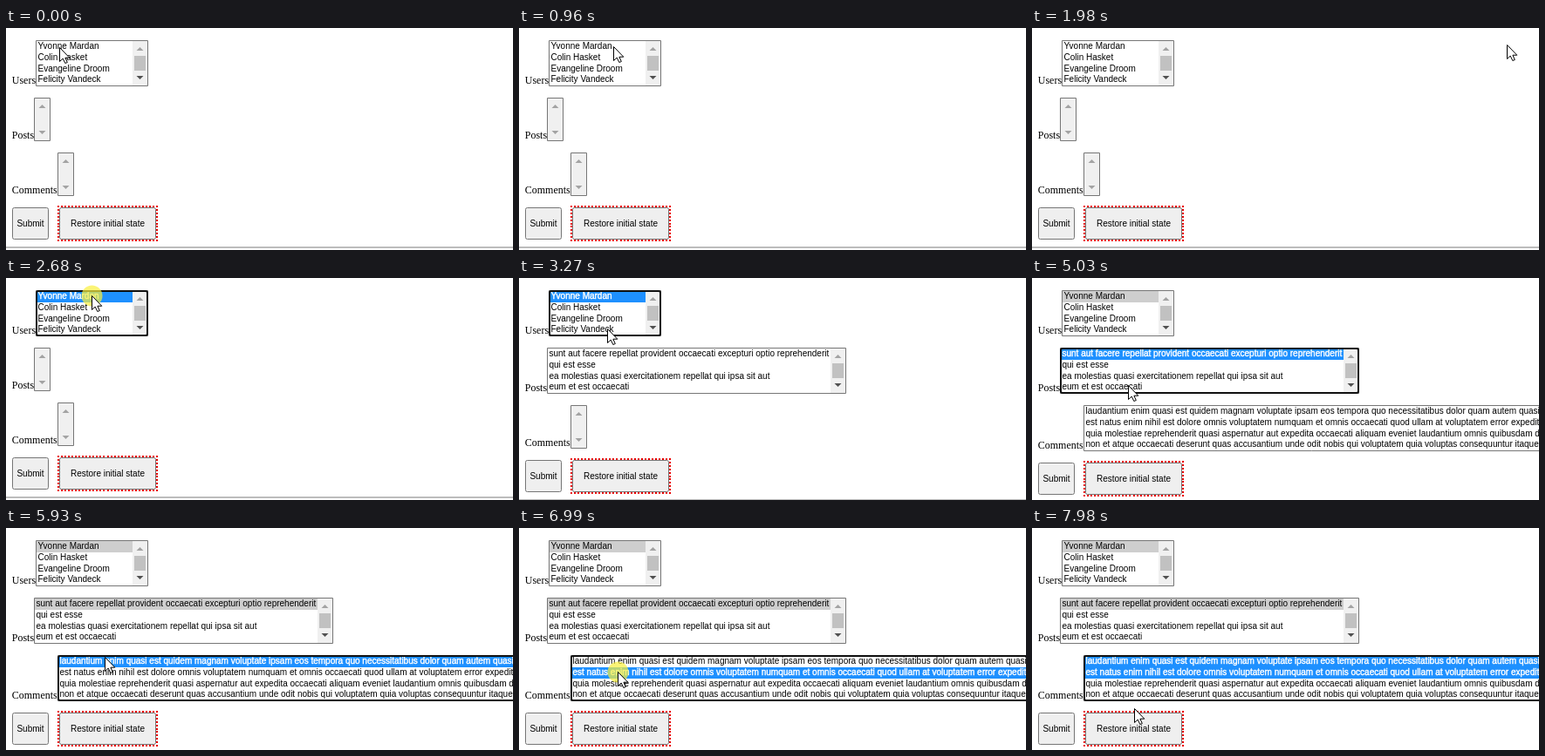
An HTML page with a canvas for the animation above (8000 ms loop, 581x255 px).

```html
<!DOCTYPE html>
<html lang="en">
<head>
<meta charset="utf-8">
<title>Linked lists form</title>
<style>
  html, body { margin: 0; width: 100%; height: 100%; overflow: hidden; background: #fff; }
  canvas { display: block; }
</style>
</head>
<body>
<canvas id="stage" width="581" height="255"></canvas>
<script>
const ctx = document.getElementById('stage').getContext('2d');
const LOOP = 8000;
const SANS = '10px "Liberation Sans", Arial, sans-serif';
const SERIF = '12px "Liberation Serif", "Times New Roman", serif';

const users = ['Yvonne Mardan', 'Colin Hasket', 'Evangeline Droom', 'Felicity Vandeck'];
const posts = [
  'sunt aut facere repellat provident occaecati excepturi optio reprehenderit',
  'qui est esse',
  'ea molestias quasi exercitationem repellat qui ipsa sit aut',
  'eum et est occaecati'
];
const comments = [
  'laudantium enim quasi est quidem magnam voluptate ipsam eos tempora quo necessitatibus dolor quam autem quasi reiciendis',
  'est natus enim nihil est dolore omnis voluptatem numquam et omnis occaecati quod ullam at voluptatem error expedita pariatur',
  'quia molestiae reprehenderit quasi aspernatur aut expedita occaecati aliquam eveniet laudantium omnis quibusdam delectus',
  'non et atque occaecati deserunt quas accusantium unde odit nobis qui voluptatem quia voluptas consequuntur itaque dolor'
];

// Moments at which the form changes
const PICK_USER = 2680, POSTS_IN = 2750;
const PICK_POST = 4310, COMMENTS_IN = 4440;
const PICK_FIRST = 5850, FIRST_DONE = 5930;
const PICK_SECOND = 6990, BOTH_PICKED = 7070;
const clicks = [[PICK_USER, POSTS_IN], [PICK_POST, COMMENTS_IN],
                [PICK_FIRST, FIRST_DONE], [PICK_SECOND, BOTH_PICKED]];

const easeIn = p => p * p;
const easeOut = p => 1 - (1 - p) * (1 - p);

// Pointer moves: start, end, steps, bend x/y, goal x/y, easing
const moves = [
  [130, 230, 3, 63, 22, 65, 22, easeOut],
  [920, 1045, 6, 260, 16, 467, 28, easeIn],
  [1980, 1981, 1, 544, 19, 544, 19, easeOut],
  [2010, 2620, 22, 300, -19, 98, 20, easeOut],
  [2960, 3740, 26, 105, 50, 98, 81, easeOut],
  [3790, 4020, 5, 100, 83, 98, 85, easeOut],
  [4720, 5480, 24, 110, 114, 113, 143, easeOut],
  [5530, 5720, 4, 113, 146, 113, 148, easeOut],
  [6110, 6430, 10, 113, 157, 113, 165, easeOut],
  [7360, 7980, 20, 116, 188, 117, 207, easeOut]
];

function pointerAt(t) {
  let x = 61, y = 22;
  for (const [start, end, steps, bx, by, gx, gy, ease] of moves) {
    if (t < start) break;
    const part = Math.min(1, (t - start) / (end - start));
    const p = ease((Math.floor(part * (steps - 1)) + 1) / steps), q = 1 - p;
    x = q * q * x + 2 * q * p * bx + p * p * gx;
    y = q * q * y + 2 * q * p * by + p * p * gy;
  }
  return { x: Math.round(x), y: Math.round(y), shown: t < 1070 || t >= 1980 };
}

function rect(x, y, w, h, color) {
  ctx.fillStyle = color;
  ctx.fillRect(x, y, w, h);
}

function frame(x, y, w, h, fill, radius = 0) {
  ctx.beginPath();
  ctx.roundRect(x + 0.5, y + 0.5, w - 1, h - 1, radius);
  ctx.fillStyle = fill;
  ctx.fill();
  ctx.strokeStyle = '#767676';
  ctx.lineWidth = 1;
  ctx.stroke();
}

function text(str, x, y, font = SANS, color = '#000', align = 'left') {
  ctx.font = font;
  ctx.fillStyle = color;
  ctx.textAlign = align;
  ctx.fillText(str, x, y);
}

// White on blue is rendered a little heavier
function selectedText(str, x, y) {
  text(str, x, y, SANS, '#fff');
  ctx.strokeStyle = '#fff';
  ctx.lineWidth = 0.4;
  ctx.strokeText(str, x, y);
}

function arrow(x, y, dir, color) {
  ctx.beginPath();
  ctx.moveTo(x - 4, y + 2 * dir);
  ctx.lineTo(x + 4, y + 2 * dir);
  ctx.lineTo(x, y - 2 * dir);
  ctx.fillStyle = color;
  ctx.fill();
}

function scrollbar(x, y, h, active) {
  rect(x, y + 1, 17, h - 2, '#f0f0f0');
  if (active) rect(x + 2, y + 18, 13, 17, '#c1c1c1');
  arrow(x + 8.5, y + 10, 1, '#a3a3a3');
  arrow(x + 8.5, y + h - 10, -1, active ? '#505050' : '#a3a3a3');
}

// Draws a labelled list box and returns its bottom edge
function listBox(label, x, y, fullWidth, rows, picked, focused) {
  const filled = rows.length > 0;
  const w = filled ? fullWidth : 19, h = filled ? 53 : 50;
  text(label, 6.75, y + h - 3, SERIF);
  frame(x, y, w, h, '#fff');
  rows.forEach((row, i) => {
    const top = Math.round(y + 1 + 12.75 * i);
    const base = Math.round(y + 10 + 12.75 * i);
    const on = picked.includes(i);
    if (on) rect(x + 1, top, w - 19, 13, focused ? '#1e90ff' : '#cecece');
    if (on && focused) selectedText(row, x + 2.5, base);
    else text(row, x + 2.5, base);
  });
  scrollbar(x + w - 18, y, h, filled);
  if (focused) {
    ctx.beginPath();
    ctx.roundRect(x + 1, y + 1, w - 2, h - 2, 2);
    ctx.strokeStyle = '#101010';
    ctx.lineWidth = 2;
    ctx.stroke();
  }
  return y + h;
}

// Dotted border whose dots meet at the corners
function dottedBox(x, y, w, h, color) {
  const cols = Math.round((w - 2) / 4), rows = Math.round((h - 2) / 4);
  for (let i = 0; i <= cols; i++) {
    const dx = Math.round(x + (w - 2) * i / cols);
    rect(dx, y, 2, 2, color);
    rect(dx, y + h - 2, 2, 2, color);
  }
  for (let i = 1; i < rows; i++) {
    const dy = Math.round(y + (h - 2) * i / rows);
    rect(x, dy, 2, 2, color);
    rect(x + w - 2, dy, 2, 2, color);
  }
}

function buttons(y) {
  frame(7, y, 42, 37, '#efefef', 2);
  text('Submit', 28, y + 22, SANS, '#000', 'center');
  frame(61, y, 111, 37, '#efefef', 2);
  text('Restore initial state', 116.5, y + 22, SANS, '#000', 'center');
  dottedBox(59, y - 2, 115, 41, '#e80000');
}

function pointer({ x, y }) {
  const outline = [[0, 0], [0, 16], [3.7, 12.6], [6.3, 18], [8.8, 17], [6.4, 11.7], [11.3, 11.7]];
  ctx.beginPath();
  for (const [dx, dy] of outline) ctx.lineTo(x + 0.5 + dx, y + 0.5 + dy);
  ctx.closePath();
  ctx.fillStyle = '#fff';
  ctx.fill();
  ctx.strokeStyle = '#000';
  ctx.lineWidth = 1;
  ctx.stroke();
}

function pickedComments(t) {
  if (t < PICK_FIRST) return [];
  if (t < PICK_SECOND) return [0];
  return t < BOTH_PICKED ? [1] : [0, 1];
}

function draw(t) {
  rect(0, 0, 581, 255, '#fff');
  let y = listBox('Users', 34, 14, 129, users,
    t >= PICK_USER ? [0] : [], t >= PICK_USER && t < PICK_POST);
  y = listBox('Posts', 32, y + 13, 343, t >= POSTS_IN ? posts : [],
    t >= PICK_POST ? [0] : [], t >= PICK_POST && t < PICK_FIRST);
  y = listBox('Comments', 59, y + 13, 640, t >= COMMENTS_IN ? comments : [],
    pickedComments(t), t >= PICK_FIRST);
  buttons(y + 13);
  rect(0, y + 58, 581, 2, '#bcbcbc');

  const tip = pointerAt(t);
  if (clicks.some(([from, to]) => t >= from && t < to)) {
    ctx.beginPath();
    ctx.arc(tip.x + 0.5, tip.y + 0.5, 12, 0, Math.PI * 2);
    ctx.fillStyle = 'rgba(250, 240, 60, 0.7)';
    ctx.fill();
  }
  if (tip.shown) pointer(tip);
}

const begin = performance.now();
function tick() {
  draw((performance.now() - begin) % LOOP);
  requestAnimationFrame(tick);
}
tick();
</script>
</body>
</html>
```
